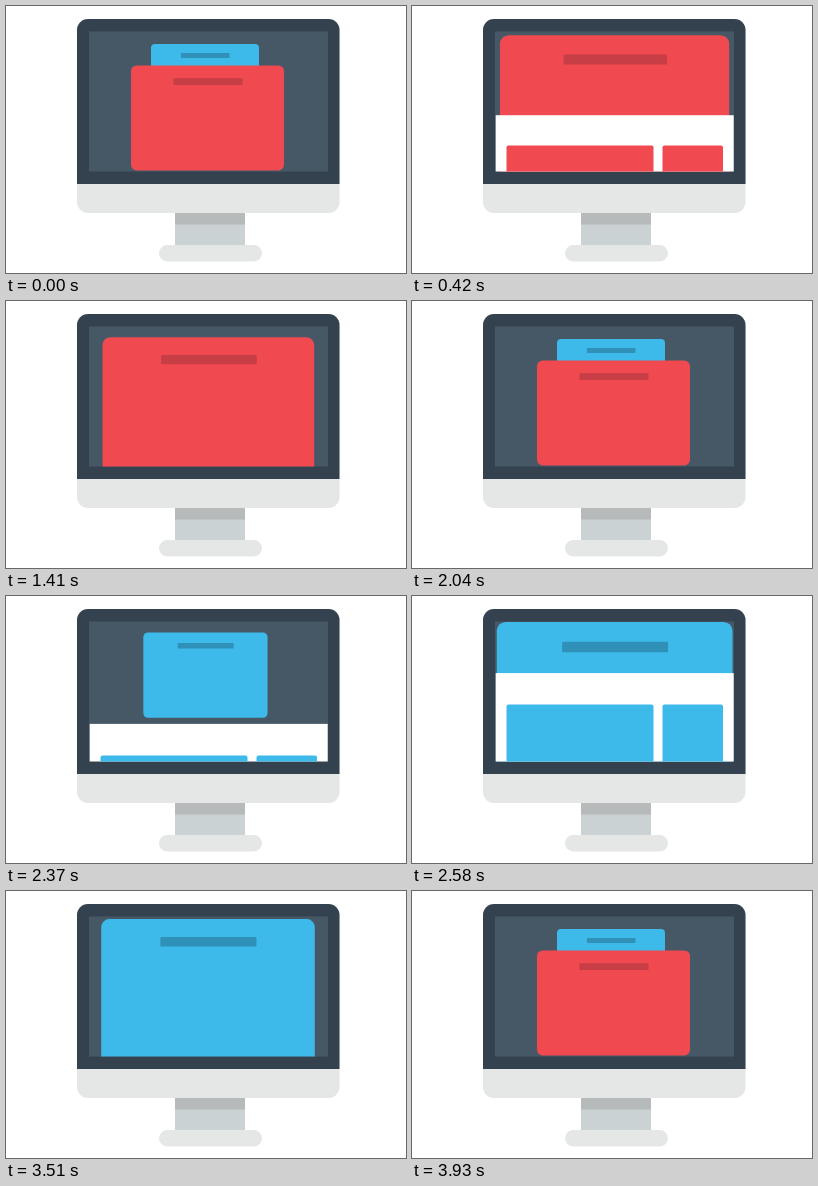
An HTML page for the animation above (4.11 s loop, 400 by 267 pixels).

```html
<!DOCTYPE html>
<html lang="en">
<head>
<meta charset="utf-8">
<title>Desktop cards</title>
<style>
  html, body { margin: 0; width: 100%; height: 100%; overflow: hidden; background: #fff; }
  svg { display: block; width: 100vw; height: 100vh; }
</style>
</head>
<body>
<svg viewBox="0 0 400 267" preserveAspectRatio="none">
  <defs>
    <clipPath id="screen"><rect x="83" y="25.5" width="239" height="140"/></clipPath>
    <clipPath id="monitor"><rect x="71" y="13" width="262.5" height="194" rx="11"/></clipPath>
  </defs>
  <rect x="169" y="206" width="70" height="13" fill="#b6babb"/>
  <rect x="169" y="218.5" width="70" height="21" fill="#cad2d3"/>
  <rect x="153" y="239" width="103" height="16.5" rx="8.2" fill="#e4e7e6"/>
  <g clip-path="url(#monitor)">
    <rect x="71" y="13" width="263" height="194" fill="#e4e7e6"/>
    <rect x="71" y="13" width="263" height="165" fill="#344250"/>
  </g>
  <g clip-path="url(#screen)">
    <rect x="83" y="25" width="239" height="141" fill="#465866"/>
    <g id="blueCard" fill="#3dbaea">
      <rect width="238" height="163.5" rx="9"/>
      <rect x="66" y="20" width="107" height="10.7" rx="1" fill="#2f90b8"/>
    </g>
    <g id="redCard" fill="#f04a50">
      <rect width="238" height="163.5" rx="9"/>
      <rect x="66" y="20" width="107.5" height="10.5" rx="1" fill="#c73e46"/>
    </g>
    <g id="page">
      <rect x="83.7" width="238" height="150" fill="#fff"/>
      <g id="blocks">
        <rect x="94.5" width="147" height="90" rx="2"/>
        <rect x="250.5" width="60.5" height="90" rx="2"/>
      </g>
    </g>
  </g>
</svg>
<script>
const LOOP = 4110, STEP = 30, HIDDEN = 168;
const FULL = { x: 83.7, y: 25.7, w: 238 };
const RED = { x: 125, y: 59.4, w: 153 };
const BLUE = { x: 145, y: 38, w: 108 };
const RED_AWAY = { x: 119, y: 172, w: 165 };

const $ = id => document.getElementById(id);
const redCard = $('redCard'), blueCard = $('blueCard'), page = $('page'), blocks = $('blocks');

const clamp = v => Math.min(1, Math.max(0, v));
const span = (t, from, to) => clamp((t - from) / (to - from));
const easeIn = u => u * u;
const easeOut = u => 1 - (1 - u) ** 2;
const easeInOut = u => u < 0.5 ? 2 * u * u : 1 - 2 * (1 - u) ** 2;
const mix = (a, b, u) => a + (b - a) * u;
const blend = (a, b, u) => ({ x: mix(a.x, b.x, u), y: mix(a.y, b.y, u), w: mix(a.w, b.w, u) });

function place(card, { x, y, w }) {
  card.setAttribute('transform', `translate(${x} ${y}) scale(${w / FULL.w})`);
}

function draw(t) {
  const redOpen = easeInOut(span(t, 80, 520)) - easeInOut(span(t, 1290, 1595));
  const blueOpen = easeInOut(span(t, 2290, 2610)) - easeInOut(span(t, 3415, 3725));
  const redAway = easeIn(span(t, 2035, 2290)) - easeOut(span(t, 3690, 3930));
  const redPage = easeOut(span(t, 280, 600)) - easeIn(span(t, 1050, 1350));
  const bluePage = easeOut(span(t, 2290, 2610)) - easeIn(span(t, 3180, 3480));

  place(blueCard, blend(BLUE, FULL, blueOpen));
  place(redCard, redAway > 0 ? blend(RED, RED_AWAY, redAway) : blend(RED, FULL, redOpen));

  const isRed = t < 1800;
  const top = isRed ? mix(HIDDEN, 82, redPage) : mix(HIDDEN, 76.3, bluePage);
  page.setAttribute('transform', `translate(0 ${top})`);
  blocks.setAttribute('transform', `translate(0 ${isRed ? 30.2 : 31.5})`);
  blocks.setAttribute('fill', isRed ? '#f04a50' : '#3dbaea');
}

const start = performance.now();
function tick() {
  const t = (performance.now() - start) % LOOP;
  draw(Math.floor(t / STEP) * STEP);
  requestAnimationFrame(tick);
}
tick();
</script>
</body>
</html>
```
